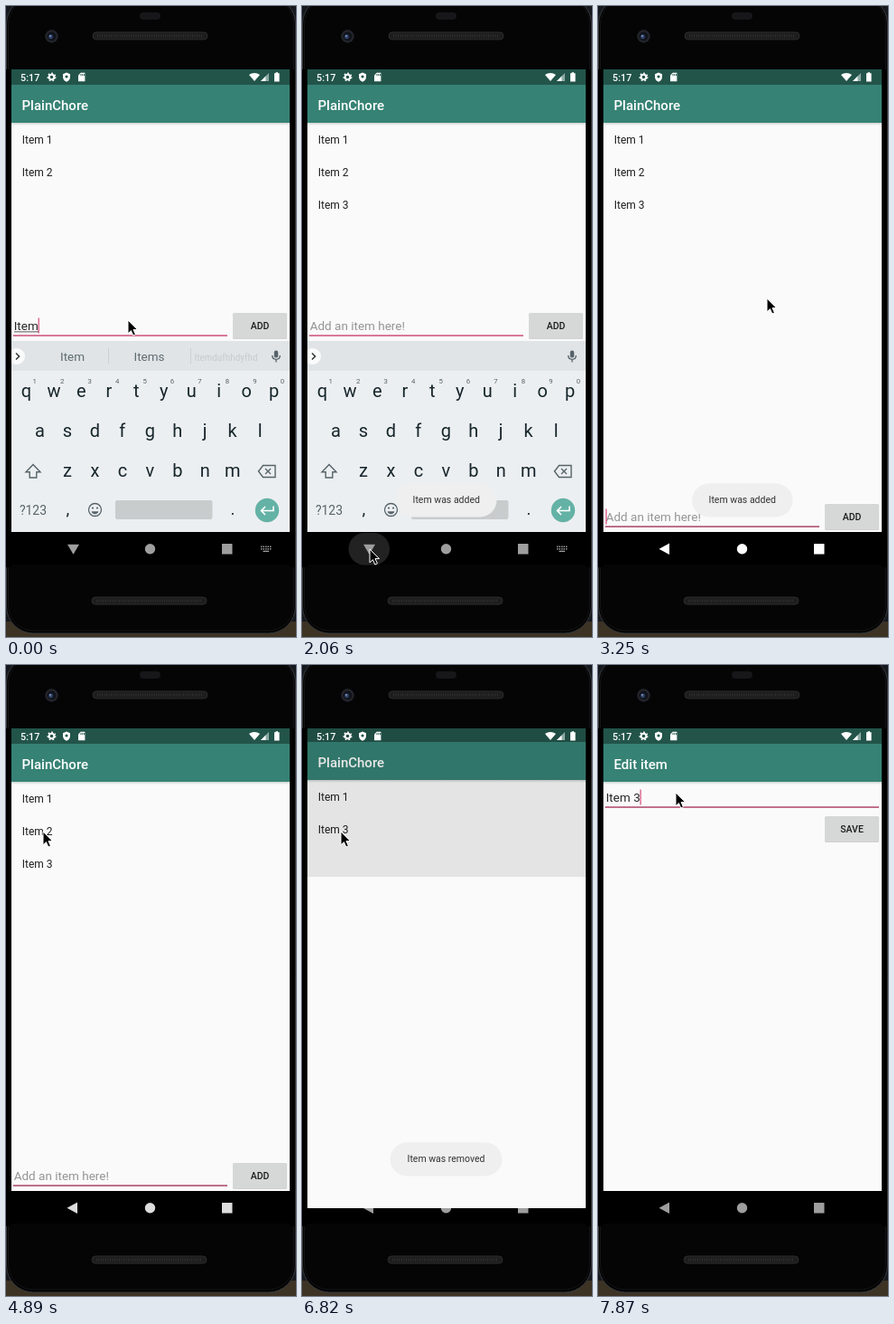
These frames come from a looping animation (321 by 697 pixels, 8 s). An HTML page with a canvas:

```html
<!DOCTYPE html>
<html lang="en">
<head>
<meta charset="utf-8">
<title>To-do list on a phone</title>
<style>
html, body { margin: 0; width: 100%; height: 100%; overflow: hidden; background: #000; }
canvas { display: block; width: 321px; height: 697px; }
</style>
</head>
<body>
<canvas id="stage"></canvas>
<script>
const W = 321, H = 697, LOOP = 8000, STEP = LOOP / 54;
const FONT = 'Roboto, "Noto Sans", sans-serif';
const canvas = document.getElementById('stage');
const c = canvas.getContext('2d');
const dpr = window.devicePixelRatio || 1;
canvas.width = W * dpr;
canvas.height = H * dpr;

// Pointer path: step, x, y
const POINTER = [
  [3, 135, 347], [6, 276, 347], [8, 277, 347], [11, 75, 600], [15, 75, 600],
  [18, 187, 323], [22, 187, 323], [26, 48, 189], [27, 41, 184], [34, 41, 184],
  [36, 43, 184], [48, 43, 184], [52, 86, 141]
];

const clamp = v => Math.max(0, Math.min(1, v));
const ramp = (v, a, b) => clamp((v - a) / (b - a));
const mix = (a, b, p) => a + (b - a) * p;
const gray = v => `rgb(${v},${v},${v})`;

function rect(x, y, w, h, fill) {
  c.fillStyle = fill;
  c.fillRect(x, y, w, h);
}

function pill(x, y, w, h, r, fill, stroke) {
  c.beginPath();
  c.roundRect(x, y, w, h, r);
  if (fill) { c.fillStyle = fill; c.fill(); }
  if (stroke) { c.strokeStyle = stroke; c.lineWidth = 1; c.stroke(); }
}

function disc(x, y, r, fill) {
  c.beginPath();
  c.arc(x, y, r, 0, 7);
  c.fillStyle = fill;
  c.fill();
}

function shape(d, x, y, fill, stroke, width = 1.4) {
  const p = new Path2D(d);
  c.save();
  c.translate(x, y);
  if (fill) { c.fillStyle = fill; c.fill(p); }
  if (stroke) { c.strokeStyle = stroke; c.lineWidth = width; c.stroke(p); }
  c.restore();
}

function text(s, x, y, size, fill, align = 'left', weight = 400) {
  c.font = `${weight} ${size}px ${FONT}`;
  c.textAlign = align;
  c.fillStyle = fill;
  c.fillText(s, x, y);
}

function faded(alpha, draw) {
  c.save();
  c.globalAlpha = alpha;
  draw();
  c.restore();
}

function grille(x, y, w) {
  pill(x, y, w, 8, 4, '#1d1d1e', '#2c2c2d');
  c.setLineDash([1, 1.5]);
  c.strokeStyle = '#303031';
  c.lineWidth = 3;
  c.beginPath();
  c.moveTo(x + 5, y + 4);
  c.lineTo(x + w - 5, y + 4);
  c.stroke();
  c.setLineDash([]);
}

function phone() {
  rect(0, 0, W, H, '#15191e');
  rect(0, 680, W, 17, '#3d3325');
  pill(0.5, -10, 320, 703, 30, '#030304', '#3a3b3e');
  pill(2.5, -8, 316, 698, 28, '#050506', '#141416');
  rect(0, 70, 6, 550, '#000');
  rect(314, 70, 5, 550, '#000');
  pill(148, 7, 23, 8, 4, '#17171a');
  disc(50.5, 33.5, 7.2, '#24262b');
  disc(50.5, 33.5, 5, '#11141c');
  disc(49.5, 34, 2.4, '#34466c');
  disc(49, 33, 1, '#7d93c0');
  grille(96, 29, 127);
  grille(95, 653, 127);
}

function statusIcons() {
  const w = '#fff';
  text('5:17', 16, 82.5, 10.8, w, 'left', 500);
  c.strokeStyle = w;
  c.lineWidth = 2;
  c.beginPath();
  c.arc(50.5, 78.5, 2.8, 0, 7);
  c.stroke();
  c.lineWidth = 1.5;
  c.setLineDash([1.7, 2.1]);
  c.beginPath();
  c.arc(50.5, 78.5, 4.2, 0, 7);
  c.stroke();
  c.setLineDash([]);
  shape('M0-5L4-3.3V0C4 2.7 2 4.6 0 5.3C-2 4.6-4 2.7-4 0V-3.3Z', 67, 78.5, w);
  disc(67, 78, 1.6, '#22544a');
  shape('M-1-4.7H3.7V4.7H-3.7V-2Z', 83.7, 78.5, w);
  for (let i = 0; i < 3; i++) rect(82.5 + i * 1.8, 75, 0.9, 2.2, '#22544a');
  shape('M0 4.5L-6-2.5C-2.5-5.3 2.5-5.3 6-2.5Z', 275, 78.5, w);
  shape('M4.5 4.5H-4.5L4.5-4.5Z', 286.5, 78.5, '#8ba9a3');
  shape('M1 4.5H-4.5L1-1Z', 286.5, 78.5, w);
  shape('M-1.2-5.2H1.2V-4.2H2.8V5H-2.8V-4.2H-1.2Z', 299.8, 78.5, w);
}

// Coloured bars and blank page, in window coordinates
function page(title) {
  rect(6, 70, 308, 560, '#fafafa');
  rect(6, 70, 308, 17, '#22544a');
  rect(6, 87, 308, 42, '#368274');
  const g = c.createLinearGradient(0, 129, 0, 132);
  g.addColorStop(0, '#cdd3d2');
  g.addColorStop(1, '#fafafa');
  rect(6, 129, 308, 3, g);
  text(title, 17.5, 114.5, 15, '#fff', 'left', 500);
}

function button(label, y, pressed) {
  pill(251, y + 0.8, 60, 28, 1.5, '#c4c4c4');
  pill(251, y, 60, 28, 1.5, pressed ? '#c3c4c4' : '#d6d7d7');
  text(label, 281, y + 17.6, 10.5, '#1c1c1c', 'center', 500);
}

function field(value, hint, baseline, right, line, caret) {
  text(value || hint, 8.7, baseline, 13.5, value ? '#262626' : '#959595');
  const end = 8.7 + (value ? c.measureText(value).width : 0);
  rect(8, baseline + 5.3, right - 8, 1.5, line);
  if (caret !== null) rect((caret === 'start' ? 8.7 : end) - 0.2, baseline - 13.5, 1.2, 17, '#d44b76');
}

function listPage(k, keysUp, blink) {
  const bottom = keysUp ? 370 : 581;
  page('PlainChore');
  const items = ['Item 1', 'Item 2'];
  if (k >= 9) items.push('Item 3');
  if (k >= 37) items.splice(1, 1);
  items.forEach((s, i) => text(s, 17.8, 152 + 36 * i, 12, '#1f1f1f'));
  const typed = k < 1 ? 'Item' : k < 2 ? 'Item ' : k < 9 ? 'Item 3' : '';
  field(typed, 'Add an item here!', bottom - 12, 245, keysUp ? '#cc5078' : '#a94468', blink ? 'end' : null);
  if (k < 1) rect(9, bottom - 10.5, 27, 0.8, '#333');
  button('ADD', bottom - 31, k === 8);
}

function editPage(k, blink) {
  page('Edit item');
  const caret = k >= 53 ? 'end' : blink ? 'start' : null;
  field('Item 3', '', 151, 311, '#b0466a', caret);
  button('SAVE', 167, false);
}

function suggestions() {
  const ink = '#5f6b71';
  text('Item', 73.5, 391.5, 13.5, ink, 'center');
  text('Items', 158.5, 391.5, 13.5, ink, 'center');
  rect(113, 378, 0.8, 17, '#c6ccd0');
  rect(204, 378, 0.8, 17, '#c6ccd0');
  const word = 'Itemdufhhdyfhd';
  c.textAlign = 'center';
  let size = 13.5;
  do c.font = `condensed ${size}px "Roboto Condensed", ${FONT}`;
  while (c.measureText(word).width > 71 && (size -= 0.25) > 8);
  c.fillText(word, 243.5, 391.5);
}

function keyboard(k) {
  const ink = '#17262c', soft = '#56636a';
  rect(6, 370, 308, 33, '#e0e4e7');
  rect(6, 403, 308, 178, '#eceff1');
  disc(12, 387, 9, '#fafbfb');
  shape('M-2-3.5L1.6 0L-2 3.5', 13, 387, null, '#333', 1.5);
  if (k < 1) suggestions();
  pill(296.8, 380.5, 4.4, 8, 2.2, soft);
  shape('M-4.3-1C-4.3 4.7 4.3 4.7 4.3-1M0 3.5V6.5', 299, 387, null, soft, 1.3);

  const rows = [['qwertyuiop', 22.5, 431.5], ['asdfghjkl', 37.5, 475.5], ['zxcvbnm', 68, 519.5]];
  for (const [keys, x, y] of rows)
    [...keys].forEach((s, i) => text(s, x + 30.45 * i, y, 20, ink, 'center'));
  [...'1234567890'].forEach((s, i) => text(s, 31.8 + 30.45 * i, 416.5, 7.8, soft, 'center'));

  shape('M0-7.5L8 .8H3.8V7H-3.8V.8H-8Z', 30, 514, null, soft);
  shape('M-9.5 0L-4.5-6.5H9V6.5H-4.5ZM-2-3L4 3M4-3L-2 3', 289, 514, null, soft);
  text('?123', 30, 561.5, 14, soft, 'center');
  text(',', 68.3, 562, 19, ink, 'center');
  c.beginPath();
  c.arc(98.5, 556.5, 7, 0, 7);
  c.strokeStyle = soft;
  c.lineWidth = 1.3;
  c.stroke();
  disc(96, 554.5, 1.1, soft);
  disc(101, 554.5, 1.1, soft);
  shape('M-4 1.2H4C3 5.2-3 5.2-4 1.2Z', 98.5, 557, soft);
  pill(121, 546, 107.5, 21, 2, '#c8cccd');
  text('.', 251, 562, 19, ink, 'center');
  disc(289, 557, 13.2, '#64b2a6');
  shape('M7-4V1H-6M-2-3.5L-6.5 1L-2 5.5', 289, 556.5, null, '#fff', 1.6);
}

function navBar(k, keysUp) {
  rect(6, 581, 308, 36, '#000');
  if (k >= 11 && k <= 15) pill(51.5, 582, 45.5, 35.5, 18, '#222');
  const shade = Math.round(keysUp ? 158 : mix(255, 158, ramp(k, 30, 38.5)));
  const ink = gray(shade);
  shape(keysUp ? 'M-6.5-5H6.5L0 6Z' : 'M-6.5 0L5-6.3V6.3Z', keysUp ? 74.5 : 74, 599.7, ink);
  disc(159.5, 599.7, 5.7, ink);
  rect(239, 594, 11.5, 11.5, ink);
  if (!keysUp) return;
  for (let r = 0; r < 2; r++)
    for (let i = 0; i < 5; i++) rect(282 + i * 2.5, 596.5 + r * 2.5, 1.5, 1.5, ink);
  rect(284.5, 601.7, 6.5, 1.3, ink);
}

function toast(s, x, w, alpha) {
  if (alpha <= 0) return;
  faded(alpha, () => {
    pill(x, 527.5, w, 37, 18.5, '#efefef');
    text(s, x + w / 2, 549.3, 10.5, '#323232', 'center');
  });
}

function pointer(k) {
  let i = 0;
  while (i < POINTER.length - 1 && POINTER[i + 1][0] <= k) i++;
  const a = POINTER[i], b = POINTER[i + 1] || a;
  const p = a === b ? 0 : ramp(k, a[0], b[0]);
  const d = 'M0 0V14.8L3.4 11.6L5.8 17L8.4 15.8L6 10.5H10.6Z';
  shape(d, mix(a[1], b[1], p), mix(a[2], b[2], p), '#000', '#fff', 1);
}

function draw(t) {
  const k = Math.floor((t + 15) / STEP) % 54;
  const blink = k < 2 || Math.floor((k * STEP - 220) / 500) % 2 === 0;
  const keysUp = k < 16;
  c.setTransform(dpr, 0, 0, dpr, 0, 0);
  phone();
  navBar(k, keysUp);

  c.save();
  c.beginPath();
  c.rect(6, 70, 308, k === 46 ? 530 : k === 47 ? 515 : 511);
  c.clip();
  if (k < 48) {
    const opening = k >= 46;
    c.save();
    if (opening) c.translate(0, -2);
    listPage(k, keysUp, blink);
    c.restore();
    if (opening) rect(6, 70, 308, 530, 'rgba(0,0,0,0.09)');
  }
  if (k >= 46) {
    // The new window slides up while its upper edge is uncovered
    const [top, shift] = k === 46 ? [234, 19] : k === 47 ? [86, 4] : [70, 0];
    c.beginPath();
    c.rect(6, top, 308, 531);
    c.clip();
    c.translate(0, shift);
    editPage(k, blink);
  }
  c.restore();

  if (k < 17) {
    c.save();
    c.beginPath();
    c.rect(6, 370, 308, 211);
    c.clip();
    if (k === 16) {
      c.globalAlpha = 0.5;
      c.translate(0, 60);
    }
    keyboard(k);
    c.restore();
  }
  statusIcons();
  toast('Item was added', 104, 111.5, ramp(k, 8, 10) * (1 - ramp(k, 22, 25)));
  toast('Item was removed', 97.5, 124, ramp(k, 36, 38) * (1 - ramp(k, 49, 52)));
  pointer(k);
}

const start = performance.now();
function tick() {
  draw((performance.now() - start) % LOOP);
  requestAnimationFrame(tick);
}
tick();
</script>
</body>
</html>
```
